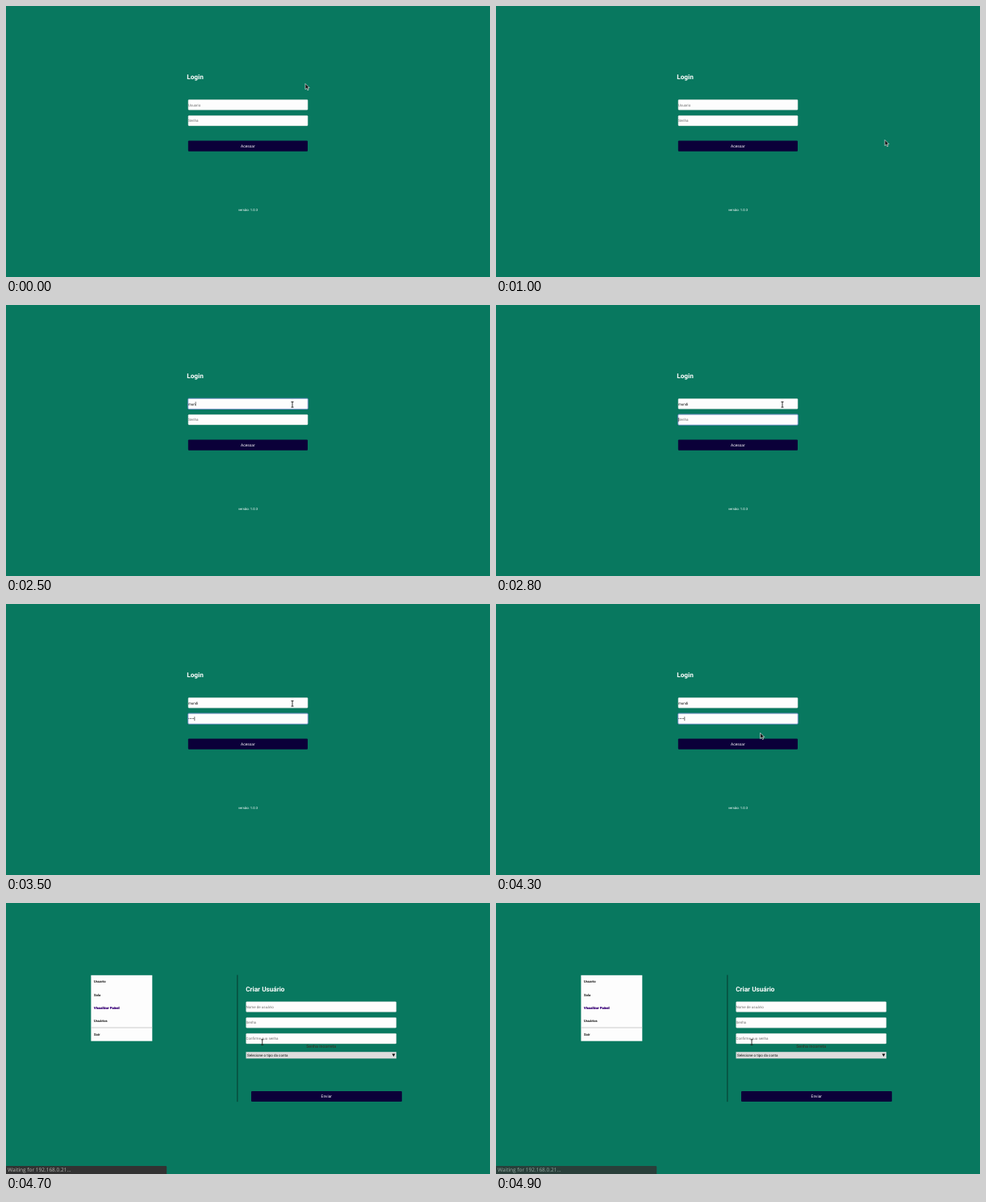
Recreate the animation shown at these times as an HTML page. Size 600 px wide and 337 px high, loop 5 s.

```html
<!DOCTYPE html>
<html lang="pt">
<head>
<meta charset="utf-8">
<title>Login</title>
<style>
  html, body { margin: 0; width: 100%; height: 100%; overflow: hidden; background: #08785f; }
  svg { display: block; width: 100vw; height: 100vh; }
  text { font: 4.5px Roboto, Arial, sans-serif; text-rendering: geometricPrecision; fill: #111; }
  .title { font-size: 8.2px; font-weight: 700; fill: #fff; }
  .hint { fill: #6c6c6c; }
  .label { font-size: 4.9px; fill: #fff; text-anchor: middle; }
  .small { font-size: 4.25px; }
  .menu text { font-size: 4.2px; font-weight: 700; }
  .menu .active { fill: #5f16b0; }
  .error { font-size: 5.3px; fill: #3d2a20; text-anchor: middle; }
  .field { fill: #fdfdfd; stroke: #c4d0cb; stroke-width: .4; }
  .button { fill: #0b0039; }
  #ring { fill: none; stroke: #7f8fdc; stroke-width: .7; }
  #status text { font: 6.5px "Open Sans", "Noto Sans", sans-serif; fill: #b8b8b2; }
</style>
</head>
<body>
<svg viewBox="0 0 600 337" preserveAspectRatio="none">
  <g id="login">
    <text class="title" x="224.3" y="90.5">Login</text>
    <rect class="field" x="225.9" y="116.5" width="148.2" height="12.7" rx="1"/>
    <rect class="field" x="225.9" y="136.3" width="148.2" height="12.7" rx="1"/>
    <rect class="button" x="225.8" y="167.6" width="148.2" height="13.2" rx="1"/>
    <rect id="ring" x="225.7" width="148.6" rx="1"/>
    <text id="user" x="225.9" y="124.6"></text>
    <text id="pass" x="225.9" y="144.4"></text>
    <path id="caret" stroke="#111" stroke-width=".6"/>
    <text class="label" x="299.8" y="175.5">Acessar</text>
    <text class="label small" x="300" y="254.6">versão: 1.0.3</text>
  </g>

  <g id="create">
    <g class="menu">
      <rect x="105.4" y="89.8" width="75.9" height="81.9" fill="#fdfdfd"/>
      <text x="109" y="99.2">Usuario</text>
      <text x="109" y="115.6">Sala</text>
      <text x="109" y="132">Visualizar Painel</text>
      <text x="109" y="132" class="active">Visualizar Painel</text>
      <text x="109" y="148.1">Usuários</text>
      <path d="M105.3 155H181.3" stroke="#aaa" stroke-width=".6"/>
      <text x="109" y="165">Sair</text>
    </g>
    <path d="M286.9 89.5V247.2" stroke="#0a1f1a" stroke-width=".7"/>
    <text class="title" x="297.2" y="110.3">Criar Usuário</text>
    <rect class="field" x="297.6" y="122.7" width="186.2" height="12.7" rx="1"/>
    <rect class="field" x="297.6" y="142.5" width="186.2" height="12.7" rx="1"/>
    <rect class="field" x="297.6" y="162.3" width="186.2" height="12.7" rx="1"/>
    <text class="hint" x="297.6" y="130.5">Nome de usuário</text>
    <text class="hint" x="297.6" y="150.3">Senha</text>
    <text class="hint" x="297.6" y="170.1">Confirme sua senha</text>
    <text class="error" x="390.7" y="179.9">Senha incorreta</text>
    <rect x="297.5" y="185.2" width="186.4" height="8.2" fill="#ddd"/>
    <text x="299" y="190.9">Selecione o tipo da conta</text>
    <path d="M478.5 187.6h4l-2 3.5z" fill="#111"/>
    <rect class="button" x="304" y="234" width="186.8" height="13" rx="1"/>
    <text class="label" x="397.3" y="242.1">Enviar</text>
  </g>

  <g id="status">
    <path d="M0 327H198q1.2 0 1.2 1.2V337H0z" fill="#323232"/>
    <text x="2" y="334.4">Waiting for 192.168.0.21…</text>
  </g>

  <g id="cursor">
    <path id="arrow" d="M0 0V7.2L1.7 5.7L2.9 8.3L4.1 7.7L3 5.2H5.2Z" fill="#111" stroke="#fff" stroke-width=".6"/>
    <path id="beam" d="M-1.5 -3.2H1.5M0 -3.2V3.4M-1.5 3.4H1.5" fill="none" stroke="#222" stroke-width=".9"/>
    <path id="hand" d="M-.7 0Q0 -.7 .6 0V2.8L3.8 3.4Q4.4 3.7 4.2 5L3.5 7.2H-.1L-2.3 4.4Q-2 3.4 -.7 4.3Z" fill="#fff" stroke="#222" stroke-width=".4"/>
  </g>
</svg>
<script>
const $ = id => document.getElementById(id);
const show = (id, on) => $(id).style.display = on ? '' : 'none';

// Mouse path: time, x, y
const path = [[400, 371, 96.5], [1000, 482, 166.5], [1100, 494, 170], [1700, 356, 124.3],
  [1800, 355, 123.7], [3900, 355, 123.7], [4500, 318, 173], [4600, 318, 173], [4900, 317, 173]];

// Moments of the key presses
const userKeys = [1900, 2000, 2500, 2600, 2700];
const passKeys = [3100, 3200, 3300, 3400, 3500];
const focusTimes = [1800, 2800, 4500];
const countBefore = (times, t) => times.filter(at => at <= t).length;

function mouseAt(t) {
  const next = path.findIndex(p => p[0] >= t);
  if (next <= 0) return path[0].slice(1);
  const [t0, x0, y0] = path[next - 1], [t1, x1, y1] = path[next];
  const u = (t - t0) / (t1 - t0), e = u * u * (3 - 2 * u);
  return [x0 + (x1 - x0) * e, y0 + (y1 - y0) * e];
}

const inside = (r, x, y) => {
  const [left, top, w, h] = ['x', 'y', 'width', 'height'].map(k => +r.getAttribute(k));
  return x >= left && x <= left + w && y >= top && y <= top + h;
};

function fill(id, value, hint) {
  $(id).textContent = value || hint;
  $(id).setAttribute('class', value ? '' : 'hint');
  return value ? $(id).getComputedTextLength() : 0;
}

function focus(t) {
  const at = countBefore(focusTimes, t), ring = $('ring');
  show('ring', at);
  show('caret', at === 1 || at === 2);
  ring.setAttribute('y', [0, 116.2, 136, 167.5][at]);
  ring.setAttribute('height', 13.3);
  ring.style.stroke = at === 3 ? '#a9b3c4' : '';
  ring.style.strokeDasharray = at === 3 ? '1 1' : '';
  return at;
}

function draw(now) {
  const t = Math.floor(now % 5000 / 100) * 100;
  const created = t >= 4700;
  show('login', !created);
  show('create', created);
  show('status', t >= 4600);
  $('status').style.opacity = t >= 4900 ? .8 : 1;

  const at = focus(t);
  const userWidth = fill('user', 'mundi'.slice(0, countBefore(userKeys, t)), 'Usuario');
  const passWidth = fill('pass', '•'.repeat(countBefore(passKeys, t)), 'Senha');
  const caretX = 226.2 + (at === 1 ? userWidth : passWidth);
  $('caret').setAttribute('d', `M${caretX} ${at === 1 ? 120.4 : 140.2}v5`);

  const [x, y] = mouseAt(t);
  const over = kind => [...$(created ? 'create' : 'login').querySelectorAll(kind)].some(r => inside(r, x, y));
  const beam = over('.field'), hand = over('.button');
  show('beam', beam);
  show('hand', hand);
  show('arrow', !beam && !hand);
  $('cursor').setAttribute('transform', `translate(${x} ${y})`);
}

const start = performance.now();
function loop() {
  draw(performance.now() - start);
  requestAnimationFrame(loop);
}
loop();
</script>
</body>
</html>
```
